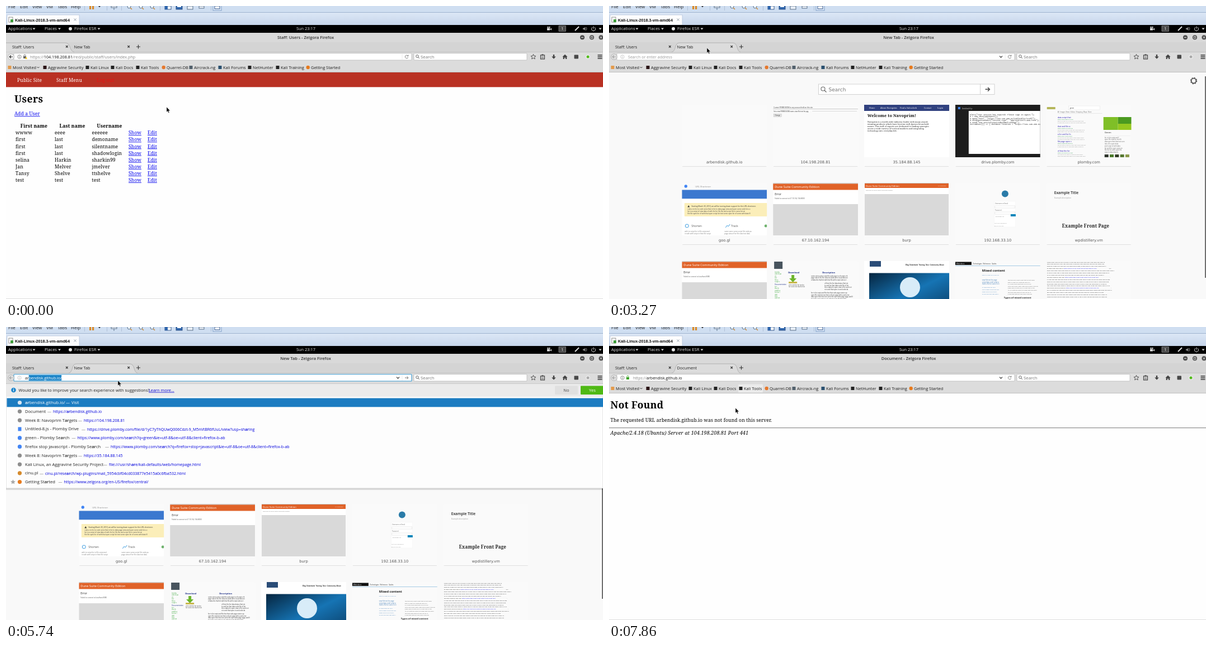
These frames come from a looping animation (1067 by 525 pixels, 8000 ms). An HTML page:

```html
<!DOCTYPE html>
<html lang="en">
<head>
<meta charset="utf-8">
<title>Browser session</title>
<style>
  html, body { margin: 0; width: 1067px; height: 525px; overflow: hidden; background: #fefefe; }
  svg { display: block; }
  text { font-family: "Open Sans", "Noto Sans", sans-serif; white-space: pre; }
  .serif { font-family: "Noto Serif", serif; letter-spacing: .021em; }
  .wide { font-family: "DejaVu Sans", sans-serif; }
  .win { font-family: "Liberation Sans", Arial, sans-serif; }
  .mono { font-family: "Liberation Mono", monospace; }
  .mid { text-anchor: middle; }
  .b { font-weight: 700; }
  .sb { font-weight: 600; }
  .link { text-decoration: underline; }
</style>
</head>
<body>
<svg id="stage" width="1067" height="525" viewBox="0 0 1067 525">
  <defs>
    <linearGradient id="strip" x2="0" y2="1"><stop stop-color="#dce7f6"/><stop offset="1" stop-color="#c6d5ea"/></linearGradient>
    <linearGradient id="sea" x2="1" y2="1"><stop stop-color="#06253f"/><stop offset=".5" stop-color="#1674b4"/><stop offset="1" stop-color="#0a3a61"/></linearGradient>
  </defs>
  <g id="view"></g>
  <g id="chrome"></g>
  <g id="live"></g>
</svg>
<script>
const $ = id => document.getElementById(id);
const T = (x, y, s, size, fill = '#222', cls = '', more = '') =>
  `<text x="${x}" y="${y}" font-size="${size}" fill="${fill}" class="${cls}" ${more}>${s}</text>`;
const R = (x, y, w, h, fill, more = '') =>
  `<rect x="${x}" y="${y}" width="${w}" height="${h}" fill="${fill}" ${more}/>`;
const C = (x, y, r, fill, more = '') => `<circle cx="${x}" cy="${y}" r="${r}" fill="${fill}" ${more}/>`;
const L = (d, stroke = '#444', w = 1, fill = 'none') =>
  `<path d="${d}" stroke="${stroke}" stroke-width="${w}" fill="${fill}"/>`;
const lines = (x, y, step, rows, size, fill, cls) =>
  rows.map((s, i) => T(x, y + i * step, s, size, fill, cls)).join('');

const WORDS = 'page code of list to file the view a script for that open with data in text some and'.split(' ');
function filler(length, seed) {
  let s = '';
  while (s.length < length) {
    seed = (seed * 73 + 41) % 9973;
    s += WORDS[seed % WORDS.length] + ' ';
  }
  return s.slice(0, length);
}
const fillers = (n, length, seed) =>
  Array.from({ length: n }, (_, i) => filler(length - (i * 7 + seed) % 9, seed + i * 31));

const HOST = 'arbendisk.github.io';

/* ---------- window frame ---------- */
function vmBar() {
  const menu = [[4, 'File'], [25, 'Edit'], [47, 'View'], [72, 'VM'], [92, 'Tabs'], [116, 'Help']];
  const glass = x => C(x, 1, 3, '#e8f1fa', 'stroke="#5a7089"') + L(`M${x + 2} 3l3 3`, '#c98b3c', 1.5);
  return R(0, 0, 1067, 12, '#cfdef1') + R(0, 11, 1067, 1, '#9fb3cf') + R(0, 12, 1067, 22, 'url(#strip)') +
    menu.map(([x, s]) => T(x, 3.5, s, 8, '#222')).join('') +
    [140, 180, 206, 275, 366].map(x => R(x, 0, .7, 8, '#a3b4cb')).join('') +
    R(149, 0, 3.2, 6, '#d98b2b') + R(154, 0, 3.2, 6, '#d98b2b') + L('M165 0h4l-2 2.5z', 'none', 0, '#333') +
    R(188, 0, 10, 3, '#e8eef6', 'stroke="#5a7089"') + L('M193 3v4', '#5a7089') +
    glass(220) + glass(241) + glass(261) +
    R(284, 0, 11, 6, '#fff', 'stroke="#35598c"') + R(284, 0, 5, 6, '#2f66ad') +
    R(304, 0, 11, 6, '#2f66ad', 'stroke="#35598c"') + R(306, 0, 7, 2, '#fff') +
    R(324, 0, 10, 6, '#e8eef6', 'stroke="#5a7089"') + R(345, 0, 9, 4, '#e8eef6', 'stroke="#5a7089"') +
    R(370, -2, 15, 10, '#dfeafa', 'stroke="#7d9cc4"') + R(373, 0, 9, 5, '#fff', 'stroke="#35598c"') +
    R(2, 16, 129, 18, '#fdfdfe', 'stroke="#a9bad2" stroke-width=".6"') +
    R(5, 20, 7, 9, '#fff', 'stroke="#777" stroke-width=".8"') + R(8, 24, 5, 5, '#3f9e3c') +
    T(16, 28, 'Kali-Linux-2018.3-vm-amd64', 7.26, '#111', 'win b') + L('M121.5 22.5l4 4m0-4l-4 4', '#7f8b99', .9);
}

function topBar() {
  const down = x => L(`M${x} 39.5h5l-2.5 3z`, 'none', 0, '#ddd');
  return R(0, 34, 1067, 14, '#000') + T(4, 43.4, 'Applications', 7.5, '#e4e4e4') + down(47.5) +
    T(69, 43.4, 'Places', 7.5, '#e4e4e4') + down(93) + C(115, 40.8, 3, '#e4e4e4') +
    T(122, 43.4, 'Firefox ESR', 7.7, '#e4e4e4') + down(163.5) +
    T(536, 43.4, 'Sun 23:17', 7.4, '#e4e4e4', 'mid') +
    R(967, 39.5, 5, 4, '#ddd') + L('M972 41.5l3-2v4z', 'none', 0, '#ddd') + C(968.5, 38, 1.2, '#ddd') + C(971.5, 38, 1.2, '#ddd') +
    R(988, 35.7, 12.5, 9.6, '#4a4a4a', 'stroke="#999" stroke-width=".7"') + T(994.2, 43.2, '1', 7, '#fff', 'mid') +
    L('M1017 44l7-7', '#ddd', 2) + L('M1031 39.5h2l2.5-2v6.5l-2.5-2h-2z', 'none', 0, '#888') +
    L('M1037 38q2 2.5 0 5.5', '#888') + L('M1048 38.2a3.5 3.5 0 1 0 4 0M1050 36.5v4', '#ddd') + down(1059.5);
}

const BOOKMARKS = [
  [12, 'Most Visited', '#e39a4b'], [75, 'Aggravine Security', '#2b1416'], [151, 'Kali Linux', '#222'],
  [196, 'Kali Docs', '#222'], [241, 'Kali Tools', '#222'], [287, 'Quarrel-DB', '#e5792e'],
  [336, 'Aircrack-ng', '#52606c'], [388, 'Kali Forums', '#29506f'], [441, 'NetHunter', '#222'],
  [491, 'Kali Training', '#222'], [545, 'Getting Started', '#e77a1c']];

function toolbar(s) {
  const tabs = ['M-2 82.5V66H106Q112 66 114.5 74T122 82.5', 'M112 82.5Q116.5 82 118.5 74T126 66H221Q227 66 229 74T235 82.5'];
  const tab = (i, fill) => L(tabs[i], '#a2a2a2', .7, fill);
  const close = x => L(`M${x - 1.8} 71l3.6 3.6m0-3.6l-3.6 3.6`, '#333', 1.1);
  const ring = x => C(x, 56.3, 4, '#4c4c4c');
  const marks = BOOKMARKS.map(([x, s, c]) => {
    const icon = s === 'Getting Started' || s === 'Quarrel-DB' ? C(x - 5.3, 110, 3.2, c) : R(x - 8.5, 107, 6, 6, c);
    return icon + T(x, 112.7, s, 7.4, '#1c1c1c');
  }).join('');
  const spin = s.spin === undefined ? '' :
    C(126, 73.5, 3, 'none', `stroke="#8a8a8a" stroke-width="1.3" stroke-dasharray="6 3" transform="rotate(${s.spin * 90} 126 73.5)"`);
  return R(0, 48, 1067, 17, '#d9d9d9') + R(0, 65, 1067, 18, '#d4d4d4') + R(0, 82.5, 1067, 36.5, '#dcdcdc') +
    R(0, 118.3, 1067, .7, '#b5b5b5') + L('M0 82.5H1067', '#b4b4b4', .6) +
    T(535.5, 59, s.title + ' - Zelgora Firefox', 7.5, '#333', 'mid sb') +
    ring(1030) + ring(1047) + ring(1063.5) + L('M1028 56.3h4', '#eee') +
    R(1045.3, 54.6, 3.4, 3.4, 'none', 'stroke="#eee" stroke-width=".8"') + L('M1061.8 54.6l3.4 3.4m0-3.4l-3.4 3.4', '#eee') +
    (s.hover ? tab(1, '#e3e3e3') : '') + tab(s.tab, '#dcdcdc') +
    T(11, 75.7, 'Staff: Users', 7.4) + close(108.8) +
    spin + T(spin ? 134 : 121.5, 75.7, s.label, 7.3) + close(219.2) + L('M236.5 69.5v7M233 73h7', '#333', 1.1) +
    (s.mark ? R(231, 102.5, 44, 15, '#ebebeb', 'rx="1.5"') : '') + marks + L('M55.5 109l2 2 2-2', '#333') +
    R(729, 84.7, 202, 12.3, '#fff', 'rx="1" stroke="#b3b3b3" stroke-width=".7"') +
    C(735, 90, 2.3, 'none', 'stroke="#555" stroke-width=".9"') + L('M736.7 91.8l2.2 2.2', '#555') +
    T(741, 93.8, 'Search', 7.8, '#777') + icons(s);
}

function icons(s) {
  return L('M942.5 86.5l1.3 2.9 3.1.3-2.3 2.1.7 3.1-2.8-1.6-2.8 1.6.7-3.1-2.3-2.1 3.1-.3z', '#444', .9) +
    R(955.5, 88, 7, 7, 'none', 'stroke="#444" stroke-width="1.2"') + R(957.5, 86.5, 3, 2, '#444') + L('M957 91h4M957 93h4', '#444', .7) +
    L('M977.8 87h2.4v3.5h2.6l-3.8 4.2-3.8-4.2h2.6z', 'none', 0, '#444') +
    L('M994.5 91l4.5-4.3 4.5 4.3h-1.2v4h-2.3v-2.5h-2v2.5h-2.3v-4z', 'none', 0, '#444') +
    R(1015.5, 87.5, 7.5, 7, '#484848', 'rx="1"') +
    C(1040, 91, 3.8, '#eee') + C(1040, 91, 2.5, s.on ? '#53bb1d' : '#aaa') +
    L('M1057.5 88h8M1057.5 91h8M1057.5 94h8', '#333', 1.3);
}

function address(s) {
  const focus = s.focus;
  const base = R(14, 84.7, 711, 12.3, '#fff', `rx="1" stroke="${focus ? '#3a9bd2' : '#b3b3b3'}" stroke-width="${focus ? 1.1 : .7}"`) +
    C(9, 91, 5.3, s.back ? '#f4f4f4' : '#e1e1e1', 'stroke="#a6a6a6" stroke-width=".7"') +
    L('M12 91H6.5M8.8 88.5L6.3 91l2.5 2.5', s.back ? '#333' : '#a5a5a5', 1.2);
  const dim = s.secure || s.back ? '#666' : '#bbb';
  const info = C(24, 91, 3.2, 'none', `stroke="${dim}" stroke-width=".7"`) + L('M24 90.3v2.5M24 88.7v.8', dim, .9);
  const lock = c => R(31, 90, 5, 4, c) + L('M32 90v-1.3a1.5 1.5 0 0 1 3 0v1.3', c, .9);
  let text = '';
  if (s.url === 'site')
    text = lock('#666') + L('M34 94.8l2-4 2 4z', 'none', 0, '#f0c419') +
      T(43, 93.7, `https://<tspan fill="#111">104.198.208.81</tspan>/red/public/staff/users/index.php`, 7.25, '#858585');
  else if (s.url === 'hint') text = T(34, 93.7, 'Search or enter address', 7.1, '#999');
  else if (s.url === 'a') text = T(34, 93.7, 'a', 7.1) + L('M39 86.5v9', '#111', .7);
  else if (s.url === 'pick')
    text = R(40.7, 86, 58.5, 10, '#1a84c8') + T(34, 93.7, `ar<tspan fill="#fff">${HOST.slice(2)}/</tspan>`, 7, '#222');
  else if (s.url === 'plain') text = T(34, 93.7, HOST + '/', 7);
  else text = lock('#3ea32a') + T(43, 93.7, `https://<tspan fill="#111">${HOST}</tspan>`, 7.05, '#858585');
  const end = focus
    ? L('M713 91h6M716.5 88.5l2.5 2.5-2.5 2.5', '#777')
    : L('M718.5 89.5a2.8 2.8 0 1 0 .2 2.6M719 87.5v2.3h-2.3', '#777', .9);
  return base + info + text + L('M708 86v10', '#ddd', .6) + end +
    `<g opacity="${s.arrow}">${L('M698 89.7l2.5 2.5 2.5-2.5', '#333', 1.2)}</g>`;
}

/* ---------- pages ---------- */
const ROWS = ['wwww eeee eeeeee', 'first last demoname', 'first last silentname', 'first last shadowlogin',
  'selina Harkin sharkin99', 'Jan Melver jmelver', 'Tansy Shelve ttshelve', 'test test test'];

function usersPage() {
  const body = (x, y, s, fill, cls = '') => T(x, y, s, 8.5, fill, 'serif ' + cls);
  return R(0, 119, 1067, 26.3, '#b93123') + body(20, 135.8, 'Public Site', '#fff') + body(90, 135.8, 'Staff Menu', '#fff') +
    body(162, 135.8, 'Log out', '#ec1111') + T(15, 172.5, 'Users', 17.6, '#000', 'serif b') +
    body(15, 196.3, 'Add a User', '#0000ee', 'link') +
    body(50, 218.3, 'First name', '#000', 'b mid') + body(118.5, 218.3, 'Last name', '#000', 'b mid') +
    body(185, 218.3, 'Username', '#000', 'b mid') +
    ROWS.map((row, i) => {
      const y = 230.3 + i * 12.12;
      return row.split(' ').map((s, k) => body([17, 87, 153.5][k], y, s, '#000')).join('') +
        body(219, y, 'Show', '#0000ee', 'link') + body(253, y, 'Edit', '#0000ee', 'link');
    }).join('') + R(0, 524, 1067, 1, '#ddd');
}

const missingPage = () => T(2.5, 146, 'Not Found', 17.5, '#000', 'serif b') +
  T(2.5, 169.8, `The requested URL ${HOST} was not found on this server.`, 8.5, '#000', 'serif') +
  R(0, 180.2, 1067, 1, '#777') +
  T(2.5, 193.4, 'Apache/2.4.18 (Ubuntu) Server at 104.198.208.81 Port 441', 8.85, '#000', 'serif', 'font-style="italic"') +
  R(0, 524, 1067, 1, '#ddd');

const errorThumb = where => R(0, 0, 152, 94, '#fff') + R(0, 0, 152, 1.5, '#c9c9c9') + R(0, 1.5, 152, 11, '#e06228') +
  T(3, 9.2, 'Dune Suite Community Edition', 5.6, '#fff') + T(3, 21.5, 'Error', 5) +
  T(3, 29, `Failed to connect to ${where}`, 2.9, '#555') + R(0, 38, 152, 56, '#d9d9d9');

const THUMBS = [
  () => '',
  () => T(1, 5.5, 'Current PERMISSIONS to any account held on this site', 2.8, '#333') + R(0, 7, 152, .5, '#999') +
    T(1, 12.5, 'Set a new PERMISSIONS name: ' + filler(22, 5), 2.6, '#333') +
    L('M70 11.5H150', '#aaa', .4) + R(1, 16.5, 14, 5, '#e6e6e6', 'stroke="#aaa" stroke-width=".4"') + T(8, 20, 'Change', 2.7, '#333', 'mid'),
  () => R(0, 0, 152, 94, '#fff') + R(0, 0, 152, 11, '#30417f') +
    [[9, 'Home'], [29, 'About Navoprim'], [64, 'Find a Salesclerk'], [107, 'Contact'], [131, 'Login']]
      .map(([x, s]) => T(x, 7.2, s, 3.6, '#fff', 'serif')).join('') +
    T(6, 22, 'Welcome to Navoprim!', 7.2, '#111', 'serif b') +
    lines(6, 32, 3.9, ['Navoprim is a world-wide industry leader with many award-', 'winning products which have become well-known household',
      'names. Our staff of experts are dedicated to finding synergies', 'across a wide variety of vertical markets and integrating',
      'technology into everyday life.'], 3.6, '#222', 'serif'),
  () => R(0, 0, 152, 94, '#1d1d1d') + R(24, 11, 128, 77, '#fff') + R(5, 4, 4, 4, '#4285f4') + T(12, 7.8, 'Untitled-8.js', 3.3, '#ddd') +
    lines(26, 18.5, 3.55, ['alert("Your session has expired! Please sign in again.");', 'a = new XMLHttpRequest();',
      'a.open("POST", "https://104.198.208.81/red/public/staff");', 'a.setRequestHeader("Content-Type", "application/x-www-form");',
      'a.send("new_session=expired&amp;submit=Change");', 'setTimeout(() =&gt; { document.location = "https://104.198.208.81" }'], 3.4, '#222', 'mono'),
  () => R(1, 4, 15, 4, '#b5b65a') + R(40, 2, 56, 7, '#fff', 'stroke="#ddd" stroke-width=".5"') + T(42, 6.5, 'green', 2.8, '#333') +
    T(20, 14, 'All  Images  News  Videos  Shopping  Maps  More', 2.7, '#777') + R(20, 15.5, 80, .4, '#ccc') +
    [24, 40, 54, 67, 84].map((y, i) => T(20, y, filler(16, i + 9), 3.4, '#1a0dab') + T(20, y + 3, 'https://' + filler(18, i + 2), 2.5, '#00802c') +
      lines(20, y + 6, 2.8, fillers(2, 50, i * 5 + 3), 2.4, '#777')).join('') +
    R(102, 22, 26, 23, '#7fbf27') + R(128, 22, 24, 12, '#4b9a20') + R(128, 34, 24, 11, '#96c820') + T(104, 51, 'Green', 4.2) +
    R(104, 55, 46, .4, '#ddd') + lines(104, 59.5, 3.8, fillers(8, 28, 4), 2.7, '#666') +
    ['#2d332b', '#4a7b2a', '#303c24', '#567830', '#8b9a4c'].map((c, i) => R(104 + i * 9.3, 89, 7, 5, c)).join(''),

  () => C(7, 6, 2.7, '#4285f4') + T(24, 7.8, 'URL Shortener', 4.1, '#888') + R(0, 12.5, 152, 16, '#3b78cf') + R(0, 28.5, 152, 66, '#fff') +
    R(4.5, 36, 148, 24, '#fbeeb9', 'rx="1"') + L('M10 43.5l2-3.5 2 3.5z', 'none', 0, '#333') +
    T(17, 43, 'Starting March 30, 2018, we will be turning down support for this URL shortener.', 3.1, '#333') +
    lines(10, 48, 4, fillers(3, 92, 7), 2.9, '#444') +
    C(9, 77, 3, 'none', 'stroke="#3b9ce0"') + T(17, 79, 'Shorten', 5, '#555') +
    L('M78 80l3-4 2 2 3-4', '#3b9ce0') + T(88, 79, 'Track', 5, '#555') + C(150, 77, 2.5, '#6fb26e') +
    lines(5, 88, 4, fillers(2, 40, 3), 2.9, '#777') + lines(76, 88, 4, fillers(2, 42, 8), 2.9, '#777'),
  () => errorThumb('67.10.162.194:8080'),
  () => R(1, 0, 150, 94, '#fff') + R(1, 0, 150, 1, '#c9c9c9') + R(1, 1, 150, 8, '#e06228') + T(3, 6.7, 'Dune Suite Community Edition', 4.2, '#fff') +
    T(132, 6, 'CA Certificate', 2.3, '#fff') + T(3, 14, 'Welcome to Dune Suite Community Edition.', 2.4, '#666') + R(1, 20, 150, 74, '#d9d9d9'),
  () => C(89, 19.5, 6, '#2a7ba8') + R(70, 33, 38, 46, '#fff', 'stroke="#eee" stroke-width=".4"') +
    T(71, 38, 'Username or Email', 2.6, '#777') + R(71, 41, 36, 4, '#fff', 'stroke="#ccc" stroke-width=".4"') +
    T(71, 50, 'Password', 2.6, '#777') + R(71, 52, 36, 4, '#fff', 'stroke="#ccc" stroke-width=".4"') +
    T(72, 61, 'Remember Me', 2.2, '#777') + R(99, 56, 9, 4, '#0085ba') + T(70, 73, 'Lost your password?', 2.3, '#888') + T(70, 78, 'Back to the site', 2.3, '#888'),
  () => T(14, 20, 'Example Title', 6.7, '#222', 'sb') + T(14, 27.5, 'Example description', 3.2, '#999') +
    T(28, 80, 'Example Front Page', 8, '#222', 'serif b'),

  () => errorThumb('localhost:8080'),
  () => R(2, 1, 15, 13, '#48545e') + T(27, 22, 'Download', 4, '#1a2c86', 'b') + T(88, 22, 'Description', 4, '#1a2c86', 'b') +
    L('M33 25h5v6h4l-6.5 7-6.5-7h4z', 'none', 0, '#6cb52d') + R(28, 37, 15, 3, '#c8b74b') +
    lines(3, 21, 3.4, fillers(6, 9, 2), 2.7, '#32a332') + T(3, 43, 'Documentation', 2.9, '#1a2c86') +
    lines(3, 47, 3.4, fillers(7, 10, 6), 2.7, '#32a332') +
    lines(28, 44, 3.4, fillers(2, 28, 11), 2.6, '#444') + lines(68, 28, 3.4, fillers(3, 62, 8), 2.6, '#333') +
    lines(92, 41, 3.5, fillers(4, 40, 13), 2.7, '#333') + lines(68, 58, 3.5, fillers(4, 62, 4), 2.6, '#333'),
  () => R(0, 0, 152, 94, '#fff') + R(10, 0, 20, 10, '#2b4d78') + T(74, 8, 'Blog  Downloads  Training  Docs  Community  About', 2.7, '#333', 'b') +
    R(9, 21.5, 143, 73, 'url(#sea)') + C(82, 47, 18, '#d8ecf8'),
  () => R(0, 1.5, 29, 5.5, '#111') + T(2, 5.7, 'Web docs', 3.2, '#fff') + T(32, 5.7, 'Technologies   References   Guides', 2.6, '#333') +
    R(0, 8, 152, .7, '#83b8dd') + T(48, 19, 'Mixed content', 5.7, '#222', 'b') + T(48, 26, filler(30, 3), 2.5, '#3a78b5') +
    lines(48, 35, 3.5, fillers(3, 28, 5), 2.7, '#3a78b5') + lines(94, 35, 3.6, fillers(8, 46, 10), 2.5, '#444') +
    lines(48, 48, 4, fillers(4, 27, 15), 2.5, '#3a78b5') + T(87, 66.5, 'Types of mixed content', 4.2, '#222', 'b'),
  () => lines(1, 2.5, 3.9, fillers(17, 96, 17), 2.5, '#222', 'serif') +
    [14, 29.6, 49].map((y, i) => R(30 + i * 2, y - 2.2, 82, 2.7, '#f9f9f9') + T(31 + i * 2, y, 'https://' + filler(48, i + 21), 2.5, '#0000ee')).join('')
];
const LABELS = [HOST, '104.198.208.81', '35.184.88.145', 'drive.plomby.com', 'plomby.com',
  'goo.gl', '67.10.162.194', 'burp', '192.168.33.10', 'wpdistillery.vm'];

function newTabPage() {
  const tiles = THUMBS.map((draw, i) => {
    const x = 130.3 + i % 5 * 162.85, y = 177 + Math.floor(i / 5) * 140;
    return R(x, y, 152, 110.5, '#fafafa', 'rx="2"') + L(`M${x + 1} ${y + 110.5}h150`, '#dadada', .8) +
      `<svg x="${x}" y="${y}" width="152" height="94">${draw()}</svg>` +
      (LABELS[i] ? T(x + 76, y + 105, LABELS[i], 6.7, '#555', 'wide mid') : '');
  }).join('');
  return R(0, 119, 1067, 406, '#f9f9f9') + tiles +
    R(374.5, 140, 314.5, 18.5, '#fff', 'stroke="#c8c8c8" stroke-width=".8"') + L('M663.5 140v18.5', '#c8c8c8', .8) +
    C(382.5, 148.5, 3.5, 'none', 'stroke="#666" stroke-width="1.1"') + L('M385 151l3.5 3.5', '#666', 1.3) +
    T(392.5, 152.7, 'Search', 9, '#777', 'wide') + L('M672.5 149.3h7.5M677 146l3.3 3.3-3.3 3.3', '#444', 1.5) +
    C(1045, 134, 4.3, 'none', 'stroke="#555" stroke-width="1.8"') + C(1045, 134, 5.6, 'none', 'stroke="#555" stroke-width="1.2" stroke-dasharray="2.2 2.2"') +
    R(1065, 126, 2, 361, '#6f6f6f');
}

/* ---------- suggestion list ---------- */
const HITS = [
  [HOST + '/', 117, 'Visit', '#8e8e8e'],
  ['Document', 84, 'https://' + HOST, '#8e8e8e'],
  ['Week 8: Navoprim Targets', 139, 'https://104.198.208.81', '#8e8e8e'],
  ['Untitled-8.js - Plomby Drive', 145, 'https://drive.plomby.com/file/d/1yC7yThQUwQ006Cdzt-9_M5nVtBR6fUuL/view?usp=sharing', '#4285f4'],
  ['green - Plomby Search', 127.5, 'https://www.plomby.com/search?q=green&amp;ie=utf-8&amp;oe=utf-8&amp;client=firefox-b-ab', '#4285f4'],
  ['firefox stop javascript - Plomby Search', 187, 'https://www.plomby.com/search?q=firefox+stop+javascript&amp;ie=utf-8&amp;oe=utf-8&amp;client=firefox-b-ab', '#4285f4'],
  ['Week 8: Navoprim Targets', 139, 'https://35.184.88.145', '#8e8e8e'],
  ['Kali Linux, an Aggravine Security Project', 184, 'file:///usr/share/kali-defaults/web/homepage.html', '#8e8e8e'],
  ['cinu.pl', 70, 'cinu.pl/research/wp-plugins/mail_5954cbf04cd033877e5415a0c6fba532.html', '#d58a2c'],
  ['Getting Started', 103.5, 'https://www.zelgora.org/en-US/firefox/central/', '#e77a1c']];

function suggestions() {
  const strong = s => s.replace(/ar/g, '<tspan class="sb">ar</tspan>');
  return R(0, 289, 1067, 3, '#000', 'opacity=".12"') + R(0, 101.5, 1067, 187.5, '#fdfdfd', 'stroke="#b5b5b5" stroke-width=".6"') +
    R(0, 102, 1067, 23, '#ebebeb') + C(13.5, 113, 4.3, '#1f86cc') + L('M13.5 112v3.3M13.5 110v1.2', '#fff', 1.1) +
    T(22.5, 115.8, 'Would you like to improve your search experience with suggestions?', 7.4) +
    T(255, 115.8, 'Learn more...', 7.4, '#0000d8', 'link') +
    R(981, 105.5, 41, 15.5, '#e0e0e0', 'rx="1"') + T(1001.5, 116, 'No', 7.6, '#444', 'mid') +
    R(1027, 105.5, 42, 15.5, '#4fb915', 'rx="1"') + T(1048, 116, 'Yes', 7.6, '#fff', 'mid') +
    R(1.5, 127.5, 1066, 15.8, '#1c7cc1') +
    HITS.map(([title, x, url, color], i) => {
      const y = 138 + i * 15.79, ink = i ? '#222' : '#fff', blue = i ? '#0000dd' : '#fff';
      const icon = i === 3 ? R(21.5, y - 6, 6, 7, color) : C(24.5, y - 2.5, 3.6, i ? color : '#d9e6f2');
      return icon + T(34, y, strong(title), 7.6, ink) + T(x - 10, y + .3, '—', 7, i ? '#777' : '#fff') + T(x, y + .3, strong(url), 7, blue);
    }).join('') +
    L('M12.5 273.3l1.3 2.8 3 .3-2.2 2 .6 3-2.7-1.6-2.7 1.6.6-3-2.2-2 3-.3z', 'none', 0, '#aaa');
}

function pointer([kind, x, y]) {
  const shape = kind === 'I'
    ? L('M-2-4.5h1.5L0-4 .5-4.5H2M0-4V4.5M-2 5h1.5L0 4.5 .5 5H2', '#111', .9)
    : L('M0 0V9L2 7.3 3.5 10.5 4.9 9.9 3.5 6.8H6.3Z', '#fff', .4, '#000');
  return `<g transform="translate(${x} ${y})">${shape}</g>`;
}

/* ---------- timeline: each step changes only what it names ---------- */
const at = (x, y) => ({ cur: ['A', x, y] }), beam = (x, y) => ({ cur: ['I', x, y] });
const STEPS = [
  [0, { ...at(287, 181), title: 'Staff: Users', label: 'New Tab', tab: 0, url: 'site', page: 'users', arrow: 0, back: 1, on: 1 }],
  [870, at(305.5, 180.5)], [1040, at(314, 184)], [1170, at(312, 196)], [1300, at(306.5, 204.5)], [1450, at(259, 202)],
  [1600, at(237, 189)], [1720, at(251, 178)], [1870, at(216, 171)], [2000, at(180, 164)], [2150, at(167, 120)],
  [2290, { ...at(140, 100), arrow: .6 }], [2440, { ...beam(150, 92), arrow: 1 }], [2570, at(160, 78)],
  [2720, { ...at(170, 76), hover: 1 }], [2850, at(175, 75)],
  [3130, { title: 'New Tab' }],
  [3270, { tab: 1, hover: 0, page: 'tiles', url: 'hint', back: 0, on: 0 }],
  [3710, beam(175, 91)], [3870, beam(171.5, 92.5)],
  [4730, { url: 'a', focus: 1 }], [4880, beam(186, 95)], [5010, beam(200, 97)], [5590, at(200, 96)],
  [5740, { url: 'pick', list: 1 }], [6450, { list: 0 }], [6580, beam(200, 97)],
  [6700, { url: 'plain', focus: 0, page: 'blank', label: 'Connecting…', spin: 0 }],
  [6850, { url: 'secure', secure: 1, title: 'Document' }],
  [7010, { page: 'missing', label: 'Document', spin: 1 }], [7160, { spin: 2 }], [7310, { spin: 3 }],
  [7460, { spin: undefined, on: 1 }], [7590, at(208, 96)],
  [7730, { ...at(232, 108), mark: 1 }], [7860, at(226, 145)]];
let state = {};
const STATES = STEPS.map(([, change]) => state = { ...state, ...change });
const PAGES = { users: usersPage(), tiles: newTabPage(), blank: '', missing: missingPage() };
const FRAME = vmBar() + topBar();

let shown = -1, page = null;
function draw(now) {
  const t = now % 8000;
  const i = STEPS.findLastIndex(([start]) => start <= t);
  if (i !== shown) {
    const s = STATES[shown = i];
    if (s.page !== page) $('view').innerHTML = R(0, 119, 1067, 406, '#fefefe') + PAGES[page = s.page];
    $('chrome').innerHTML = FRAME + toolbar(s) + address(s);
    $('live').innerHTML = (s.list ? suggestions() : '') + pointer(s.cur);
  }
  requestAnimationFrame(draw);
}
draw(performance.now());
</script>
</body>
</html>
```
